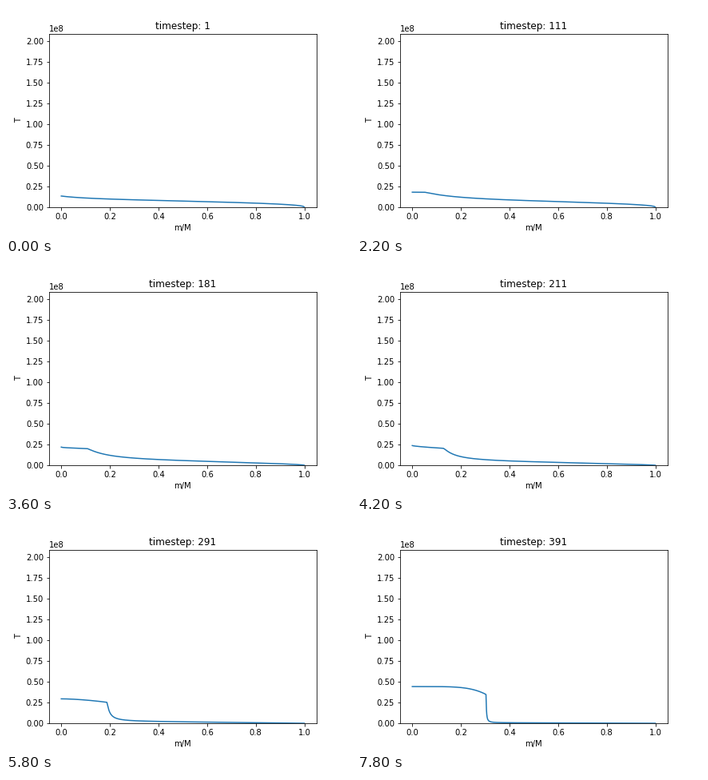
Animation of 432x288 px, one loop 8 s. Source, as a matplotlib script:

```python
import numpy as np
import matplotlib.pyplot as plt
from matplotlib.animation import FuncAnimation

FRAMES = 40
STEP_MS = 200


def ramp(t, start, end):
    """Smooth step from 0 to 1 between two times."""
    u = np.clip((t - start) / (end - start), 0, 1)
    return u * u * (3 - 2 * u)


def profile(t):
    """Mass coordinate and temperature: a hot core inside a cooling envelope."""
    surge = (t / (FRAMES - 1)) ** 20  # late rapid contraction

    # Core: heats exponentially, grows steadily, then tilts towards its edge.
    center = 0.135 * np.exp(0.0268 * t + 0.14 * surge)
    edge = center * (1 - 0.14 * ramp(t, 14.5, 21) - 0.075 * surge)
    radius = 0.0074 * max(t - 3.7, 0) * ramp(t, 6, 12) + 0.042 * surge
    bend = 0.7 * np.exp(0.109 * (t - 21))

    # Envelope: the drop outside the core sharpens while the rest cools.
    base = 0.09 / (1 + np.exp((t - 24.7) / 6.5))
    width = 0.15 * np.exp(-0.185 * max(t - 15, 0))
    sharpness = 1 + 0.4 * t / (FRAMES - 1)
    surface = 0.41 + 0.59 * ramp(t, 9, 31)

    u = np.linspace(0, 1, 120)
    core = center - (center - edge) * u ** bend

    m = radius + (1 - radius) * np.linspace(0, 1, 1200) ** 3
    excess = edge / (1 - radius) ** surface - base
    decay = 1 / (1 + ((m - radius) / width) ** sharpness)
    envelope = (base + excess * decay) * np.clip(1 - m, 0, 1) ** surface

    return np.r_[radius * u, m], 1e8 * np.r_[core, envelope]


plt.rcParams.update({"font.family": "DejaVu Sans", "font.size": 10})
fig, ax = plt.subplots(figsize=(6, 4), dpi=72)
fig.subplots_adjust(left=0.125, right=0.9, bottom=0.125, top=0.88)
line, = ax.plot([], [], color="#1f77b4", lw=1.5)
ax.set_xlim(-0.05, 1.05)
ax.set_ylim(0, 2.09e8)
ax.set_xlabel("m/M")
ax.set_ylabel("T")
title = ax.set_title("timestep: 1")


def draw(i):
    line.set_data(*profile(i))
    title.set_text(f"timestep: {1 + 10 * i}")
    return line, title


anim = FuncAnimation(fig, draw, frames=FRAMES, interval=STEP_MS,
                     init_func=lambda: draw(0), repeat=True, repeat_delay=0)
plt.show()
```
